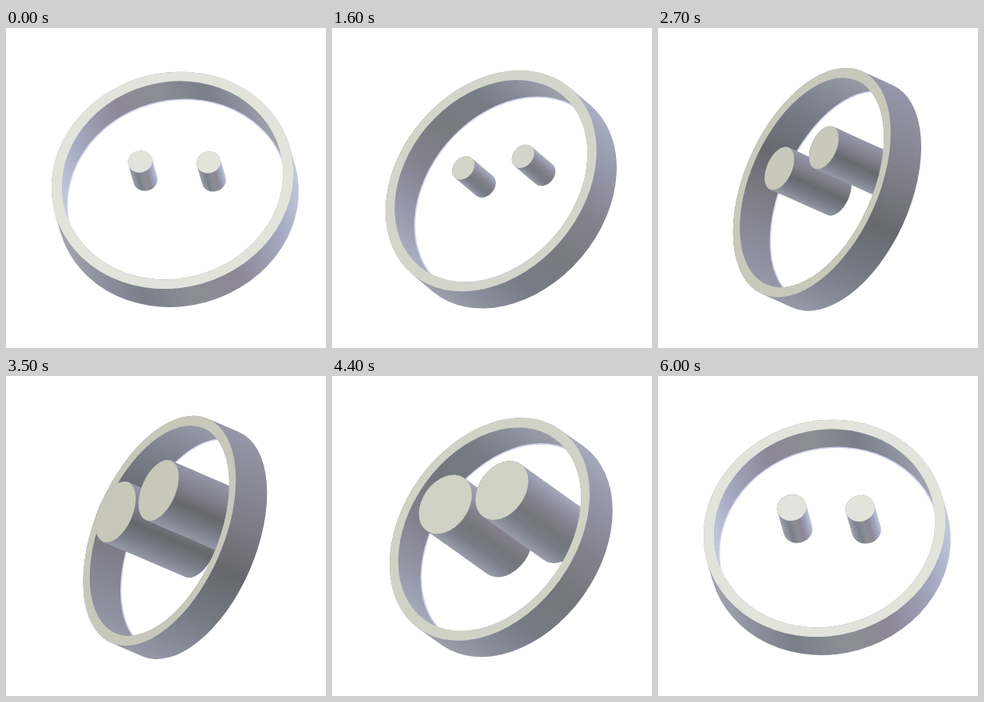
Animation, 400 px wide and 400 px high, one loop 6100 ms. Source, as an HTML page:

```html
<!DOCTYPE html>
<html lang="en">
<head>
<meta charset="utf-8">
<style>
html, body { margin: 0; width: 100%; height: 100%; overflow: hidden; background: #fff; }
svg { display: block; width: 100vw; height: 100vh; }
</style>
</head>
<body>
<svg id="stage" viewBox="0 0 400 400"></svg>
<script>
const LOOP = 6100, STEP = 100;
const OUTER = 152.6, INNER = 139.4, DEPTH = 50;
const GAP = 43.3, LIFT = 27, SINK = 2.5, ASPECT = 3.28;
const RAD = Math.PI / 180;
const ROLL = 5 * RAD, PITCH = Math.asin(0.45);

// [time, value] keys with eased spans between them
const TURN = [[0, 0], [3200, 1], [6000, 0], [6100, 0]];
const SIZE = [[0, 15.3], [1700, 16.2], [3700, 41], [4930, 39.9], [6310, 15.3]];

// shades across a cylinder, facing the light and turned away
const STOPS = [0, 0.12, 0.35, 0.55, 0.75, 0.9, 1];
const LIT = ['c3c9de', 'a7abc4', '8d8796', '8b8e94', '7b7f8a', '8e929f', 'a3a5ad'];
const DIM = ['9394a5', '8c8c9b', '7c7b85', '65666b', '757982', '878b98', '9698a6'];
const FACE = ['e2e3db', 'c6c7b9'];

const stage = document.getElementById('stage');
const smooth = x => x * x * (3 - 2 * x);
const lerp = (a, b, k) => a + (b - a) * k;

function ease(keys, t) {
  let i = 1;
  while (i < keys.length - 1 && t > keys[i][0]) i++;
  const [t0, a] = keys[i - 1], [t1, b] = keys[i];
  return lerp(a, b, smooth((t - t0) / (t1 - t0)));
}

function mix(a, b, k) {
  const part = (s, i) => parseInt(s.slice(i, i + 2), 16);
  return `rgb(${[0, 2, 4].map(i => Math.round(lerp(part(a, i), part(b, i), k))).join()})`;
}

const roll = (x, y) => [
  x * Math.cos(ROLL) - y * Math.sin(ROLL),
  x * Math.sin(ROLL) + y * Math.cos(ROLL)
];

function gradient(id, k, flip) {
  const stops = STOPS.map((s, i) => {
    const j = flip ? STOPS.length - 1 - i : i;
    const at = flip ? 1 - STOPS[j] : s;
    return `<stop offset="${at}" stop-color="${mix(LIT[j], DIM[j], k)}"/>`;
  });
  return `<linearGradient id="${id}" x1="0" y1="0" x2="0" y2="1">${stops.join('')}</linearGradient>`;
}

function draw(t) {
  const k = ease(TURN, t);
  const turn = (9.8 + 45.4 * k) * RAD;
  const sin = Math.sin(turn), cos = Math.cos(turn), tilt = Math.sin(PITCH);
  const axis = roll(sin, cos * tilt);
  const side = roll(cos, -sin * tilt);
  const up = roll(0, -Math.cos(PITCH));
  const slant = Math.hypot(...axis);
  const flat = Math.sqrt(1 - slant * slant);
  const angle = Math.atan2(axis[1], axis[0]);
  const front = -DEPTH * slant / 2;

  // local frame: x runs along the cylinder axis, y across it
  const local = (x, y) => [
    x * Math.cos(angle) + y * Math.sin(angle),
    y * Math.cos(angle) - x * Math.sin(angle)
  ];
  const disc = (x, y, r, attrs) =>
    `<ellipse cx="${x}" cy="${y}" rx="${r * flat}" ry="${r}" ${attrs}/>`;
  const tube = (a, b, y, r) => {
    const arc = `A${r * flat} ${r} 0 0 0`;
    return `<path fill="url(#out)" d="M${a} ${y - r}${arc} ${a} ${y + r}L${b} ${y + r}${arc} ${b} ${y - r}Z"/>`;
  };

  const face = mix(FACE[0], FACE[1], k);
  const r = ease(SIZE, t);
  const half = r * ASPECT * slant / 2;
  const place = (g, i) => side[i] * g + up[i] * LIFT + axis[i] * SINK;
  const posts = [-GAP, GAP].map(g => local(place(g, 0), place(g, 1)));
  const post = ([x, y], end) =>
    tube(x - half, end, y, r) + disc(x - half, y, r, `fill="${face}"`);
  const bodies = posts.map(p => post(p, p[0] + half)).join('');

  // parts standing out in front of the ring
  const cut = front - SINK * slant;
  const tips = half > -cut ? posts.map(p => post(p, p[0] + cut)).join('') : '';
  const ring = s => {
    const arc = `A${s * flat} ${s} 0 0 0`;
    return `M${front} ${-s}${arc} ${front} ${s}${arc} ${front} ${-s}Z`;
  };

  stage.innerHTML = `<defs>${gradient('out', k, false)}${gradient('in', k, true)}
    <clipPath id="hole">${disc(front, 0, INNER, '')}</clipPath></defs>
    <g transform="translate(211.4 201.8) rotate(${angle / RAD})">
    ${tube(front, -front, 0, OUTER)}
    ${disc(front, 0, INNER, 'fill="url(#in)"')}
    <g clip-path="url(#hole)">
    ${disc(-front, 0, INNER, 'fill="#fff" stroke="#d0d3ec" stroke-width="1.6"')}${bodies}</g>
    <path fill="${face}" fill-rule="evenodd" d="${ring(OUTER)}${ring(INNER)}"/>
    ${tips}</g>`;
}

let last = -1;
const start = performance.now();
function tick() {
  const t = Math.floor(((performance.now() - start) % LOOP) / STEP) * STEP;
  if (t !== last) draw(last = t);
  requestAnimationFrame(tick);
}
draw(0);
tick();
</script>
</body>
</html>
```
